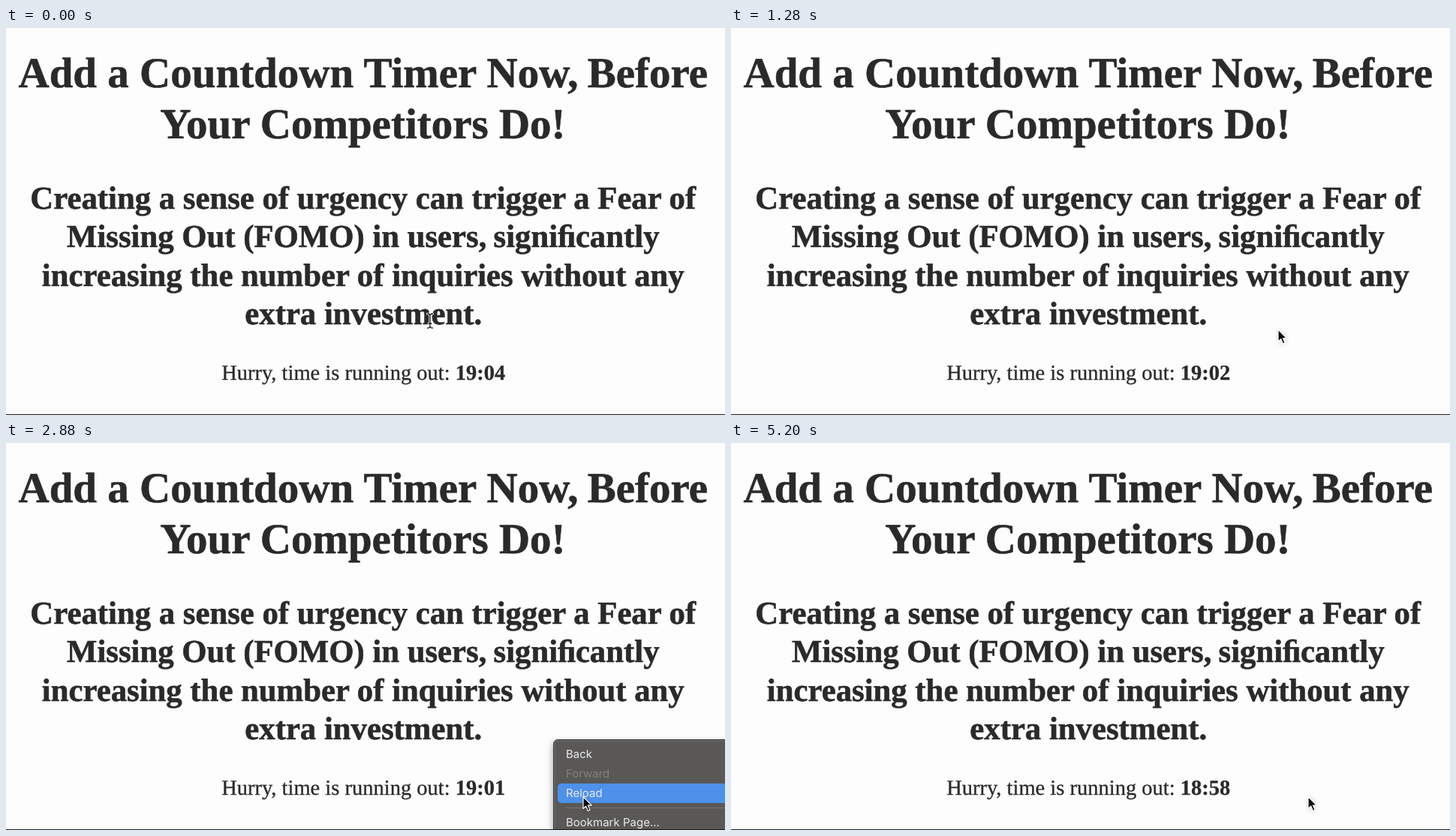
An HTML page for the animation above (5.84 s loop, 958x516 px).

```html
<!DOCTYPE html>
<html lang="en">
<head>
<meta charset="utf-8">
<title>Countdown timer</title>
<style>
  html, body { margin: 0; width: 100%; height: 100%; overflow: hidden; background: #fdfdfd; }
  svg { display: block; width: 958px; height: 516px; text-rendering: geometricPrecision; }
  .page { font-family: "Liberation Serif", Times, serif; font-weight: bold; text-anchor: middle;
          fill: #2a2a2b; stroke: #2a2a2b; stroke-width: .6px; }
  .h1 { font-size: 57px; }
  .h2 { font-size: 42.75px; }
  .p { font-size: 28.5px; font-weight: normal; stroke-width: .3px; }
  .p tspan { font-weight: bold; }
  .menu { font: 15px Inter, sans-serif; fill: #ebebeb; }
</style>
</head>
<body>
<svg viewBox="0 0 958 516">
  <defs>
    <filter id="soft" x="-20%" y="-20%" width="140%" height="140%">
      <feGaussianBlur stdDeviation="4"/>
    </filter>
    <path id="beamShape" d="M-3.5-9.5Q0-9.5 0-7Q0-9.5 3.5-9.5M0-7V7M-3.5 9.5Q0 9.5 0 7Q0 9.5 3.5 9.5M-2 3.5H2"/>
  </defs>
  <rect width="958" height="516" fill="#fdfdfd"/>
  <g fill="#a8d1fc">
    <rect id="selTop" x="530.5" y="363" height="42.7"/>
    <rect id="selBottom" x="288" y="448" height="28.5"/>
  </g>
  <g class="page">
    <g class="h1">
      <text x="475.8" y="79">Add a Countdown Timer Now, <tspan dx="-2">Before</tspan></text>
      <text x="475.4" y="147.3">Your Competitors Do!</text>
    </g>
    <g class="h2">
      <text x="475.8" y="241.2">Creating a sense of urgency can trigger a Fear of</text>
      <text x="475.8" y="292.4">Missing Out (FOMO) in users, <tspan dx="-1.5">signi&#64257;cantly</tspan></text>
      <text x="475.8" y="343.6">increasing the number of inquiries without any</text>
      <text x="476.2" y="394.8">extra investment.</text>
    </g>
    <text class="p" x="476.2" y="469.3">Hurry, time is running out: <tspan id="clock">19:04</tspan></text>
  </g>
  <g id="menu" class="menu">
    <rect x="728" y="398" width="260" height="150" rx="6" fill="#000" opacity=".3" filter="url(#soft)"/>
    <rect x="729.5" y="395.5" width="260" height="150" rx="6" fill="#595857" stroke="#3c3c3c"/>
    <path d="M731 516V402q0-5 5-5H958" fill="none" stroke="#747372"/>
    <rect id="highlight" x="735" width="240" height="26" rx="5" fill="#4e91ea"/>
    <text x="746" y="420">Back</text>
    <text x="746" y="446" fill="#82817f">Forward</text>
    <text x="746" y="472">Reload</text>
    <path d="M746 486.5H958" stroke="#757473"/>
    <text x="746" y="511">Bookmark Page...</text>
  </g>
  <rect y="515" width="958" height="1" fill="#1c1c1c"/>
  <g id="arrow">
    <path d="M0 1V17L3.8 13.5 6.6 20 9.4 18.8 6.7 12.5H11.6Z" opacity=".25" filter="url(#soft)"/>
    <path d="M0 0V16L3.7 12.6 6.4 19 9.1 17.8 6.5 11.6H11.3Z" fill="#0b0b0b" stroke="#fff" stroke-width="1.2" stroke-linejoin="round"/>
  </g>
  <g id="beam" fill="none" stroke-linecap="round">
    <use href="#beamShape" stroke="#fff" stroke-width="3"/>
    <use href="#beamShape" stroke="#1a1a1a" stroke-width="1.3"/>
  </g>
</svg>
<script>
const LOOP = 5840, STEP = 80;
const el = id => document.getElementById(id);

// Pointer path: time, x, y
const path = [
  [0, 565, 390.5], [160, 537.5, 379.5], [240, 537.5, 379.5], [320, 590, 417],
  [400, 643.5, 455], [560, 693, 476], [640, 706, 477], [880, 724, 456],
  [960, 726, 440], [1200, 729, 402], [1600, 729, 402], [1680, 737.5, 419],
  [2240, 753, 444], [2320, 753, 444], [2640, 769, 471.5], [LOOP, 769, 471.5]
];

function pointer(t) {
  const i = path.findIndex(k => k[0] > t);
  const [t0, x0, y0] = path[i - 1], [t1, x1, y1] = path[i];
  const f = (t - t0) / (t1 - t0);
  return [x0 + (x1 - x0) * f, y0 + (y1 - y0) * f];
}

function clockText(t) {
  const left = 19 * 60 + 4 - Math.floor((t + 880) / 1000);
  return Math.floor(left / 60) + ":" + String(left % 60).padStart(2, "0");
}

const show = (id, on) => el(id).setAttribute("visibility", on ? "visible" : "hidden");

function draw(ms) {
  const t = Math.floor(ms / STEP) * STEP;
  const [x, y] = pointer(t);
  el("clock").textContent = clockText(t);

  const selecting = t >= 320 && t < 1200;
  el("selTop").setAttribute("width", !selecting ? 0 : t < 400 ? 35.5 : 103.5);
  el("selBottom").setAttribute("width", !selecting || t < 400 ? 0 : t < 480 ? 324 : 377);

  const useArrow = t >= 320;
  show("arrow", useArrow);
  show("beam", !useArrow);
  el(useArrow ? "arrow" : "beam").setAttribute("transform", `translate(${x} ${y})`);

  const open = t >= 1440 && t < 3120;
  show("menu", open);
  el("menu").setAttribute("opacity", t < 2960 ? 1 : t < 3040 ? 0.7 : 0.3);
  const row = y < 428 ? 402 : y < 454 ? 0 : 454;
  const blink = t === 2800;
  show("highlight", open && t >= 1680 && row && !blink);
  el("highlight").setAttribute("y", row);
}

const start = performance.now();
function tick() {
  draw((performance.now() - start) % LOOP);
  requestAnimationFrame(tick);
}
tick();
</script>
</body>
</html>
```
